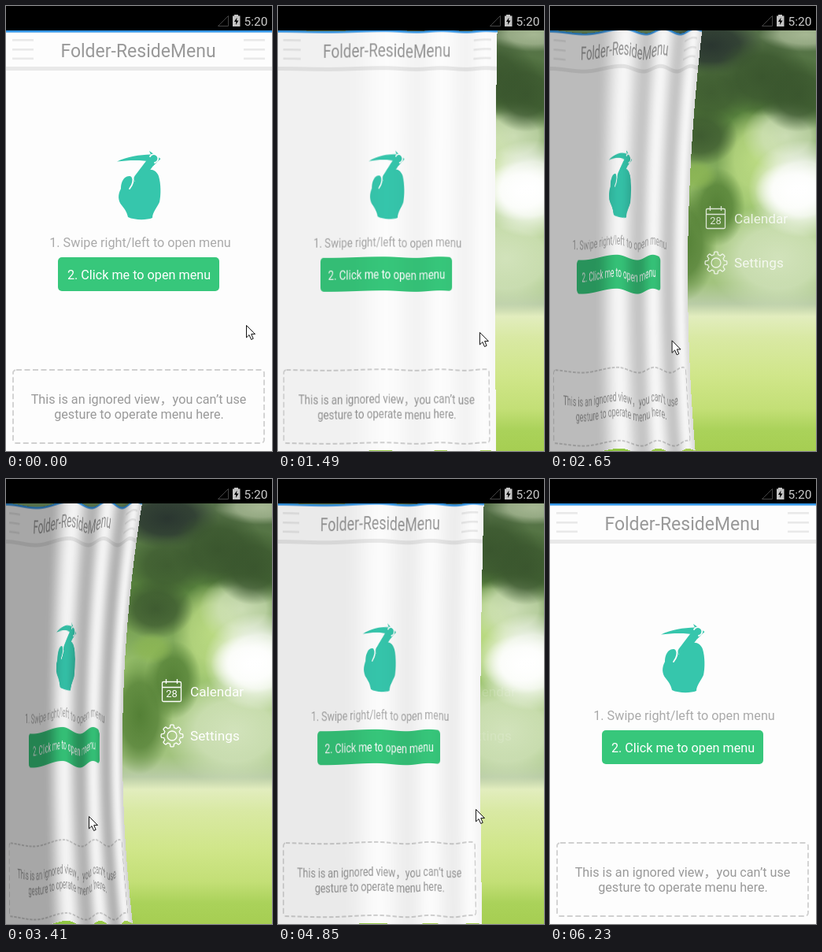
Write an HTML page with a canvas that moves like this. It is 338 px wide and 565 px high and loops after 6290 ms.

```html
<!DOCTYPE html>
<html lang="en">
<head>
<meta charset="utf-8">
<title>Folder-ResideMenu</title>
<style>
html, body { margin: 0; height: 100%; overflow: hidden; background: #000; }
canvas { display: block; width: 338px; height: 565px; }
</style>
</head>
<body>
<canvas id="stage" width="338" height="565"></canvas>
<script>
const W = 338, H = 565, TOP = 31, LOOP = 6290;
const FONT = 'Roboto, "Noto Sans CJK SC", sans-serif';
const ctx = document.getElementById('stage').getContext('2d');

// Key lists: [position, value]
const EDGE = [[620, 338], [1200, 310], [1490, 276], [2180, 207], [3050, 148],
  [3720, 148], [4280, 170], [4850, 257], [5560, 338]];
const MOUSE_X = [[620, 305], [1490, 256], [2180, 206], [3050, 111], [3170, 108], [3410, 105],
  [3720, 105], [4280, 180], [4850, 251], [5620, 298], [5800, 281]];
const MOUSE_Y = [[620, 405], [1490, 414], [2180, 420], [3050, 428], [3720, 428],
  [4280, 425], [4850, 419], [5620, 417], [5800, 570]];
const WAVE = [[0, 0], [.23, 1], [.485, -.9], [.635, 1], [.745, -.9], [.86, 1], [.95, -.9], [1, -.3]];
const LIGHT = [[.32, 0], [.5, 1], [.64, .18], [.75, 1], [.86, .18], [.95, 1], [1, .6]];

const linear = k => k;
const smooth = k => (1 - Math.cos(Math.PI * k)) / 2;

function along(keys, x, ease = linear) {
  if (x <= keys[0][0]) return keys[0][1];
  for (let i = 1; i < keys.length; i++) {
    const [x0, v0] = keys[i - 1], [x1, v1] = keys[i];
    if (x < x1) return v0 + (v1 - v0) * ease((x - x0) / (x1 - x0));
  }
  return keys[keys.length - 1][1];
}

function layer(paint) {
  const c = document.createElement('canvas');
  c.width = W;
  c.height = H;
  const g = c.getContext('2d');
  g.imageSmoothingQuality = 'high';
  if (paint) paint(g);
  return c;
}

function label(g, text, x, y, size, color, align = 'center') {
  g.font = `${size}px ${FONT}`;
  g.textAlign = align;
  g.fillStyle = color;
  g.fillText(text, x, y);
}

function box(g, x, y, w, h, r) {
  g.beginPath();
  g.roundRect(x, y, w, h, r);
}

function blob(g, x, y, rx, ry, rgb, alpha = 1) {
  g.save();
  g.translate(x, y);
  g.scale(rx, ry);
  const fill = g.createRadialGradient(0, 0, 0, 0, 0, 1);
  fill.addColorStop(0, `rgba(${rgb},${alpha})`);
  fill.addColorStop(.55, `rgba(${rgb},${alpha * .8})`);
  fill.addColorStop(1, `rgba(${rgb},0)`);
  g.fillStyle = fill;
  g.fillRect(-1, -1, 2, 2);
  g.restore();
}

function paintGarden(g) {
  const fill = g.createLinearGradient(0, TOP, 0, H);
  [[0, '#56704a'], [.2, '#56803c'], [.4, '#9cc46e'], [.6, '#a2c37e'], [.65, '#b9cca6'],
   [.68, '#e2edbe'], [.73, '#d9e9a4'], [.82, '#d0e68a'], [.9, '#c3df76'], [.95, '#aad25a'], [1, '#a6ce52']]
    .forEach(([at, color]) => fill.addColorStop(at, color));
  g.fillStyle = fill;
  g.fillRect(0, 0, W, H);
  const dark = '58,86,46', leaf = '84,128,54', lime = '186,218,130', pale = '212,228,190';
  // Light first, foliage over it
  blob(g, 325, 36, 60, 22, '180,196,160', .85);
  blob(g, 262, 195, 50, 65, lime);
  blob(g, 300, 165, 55, 45, pale, .9);
  blob(g, 290, 320, 90, 70, pale, .95);
  blob(g, 322, 232, 70, 62, '255,255,255');
  blob(g, 310, 235, 50, 38, '255,255,255');
  blob(g, 205, 50, 65, 38, '42,54,48');
  blob(g, 270, 90, 60, 50, dark);
  blob(g, 315, 112, 50, 48, dark);
  blob(g, 205, 110, 50, 40, dark, .8);
  blob(g, 190, 165, 48, 38, dark, .9);
  blob(g, 212, 255, 36, 50, leaf);
  blob(g, 170, 300, 42, 75, leaf);
  blob(g, 185, 215, 28, 20, '140,182,82', .8);
  blob(g, 0, H, 175, 40, '140,198,63');
}

function paintMenu(g) {
  g.strokeStyle = '#fff';
  g.lineWidth = 1.3;
  box(g, 198.5, 257.5, 24, 25, 1.5);
  g.moveTo(198, 264.5);
  g.lineTo(223, 264.5);
  for (const x of [203.5, 217.5]) {
    g.moveTo(x, 254);
    g.lineTo(x, 260);
  }
  g.stroke();
  label(g, '28', 210.5, 277, 13, '#fff');
  g.beginPath();
  for (let i = 0; i <= 160; i++) {
    const a = i / 160 * 2 * Math.PI;
    const r = 12.2 + 1.7 * Math.tanh(4 * Math.cos(8 * a));
    g.lineTo(211 + r * Math.cos(a), 326 + r * Math.sin(a));
  }
  g.moveTo(217, 326);
  g.arc(211, 326, 6, 0, 7);
  g.stroke();
  label(g, 'Calendar', 234, 276, 17.2, '#fff', 'left');
  label(g, 'Settings', 234, 332, 17.2, '#fff', 'left');
}

function paintHand(g) {
  const teal = '#36c6ac', paper = '#fdfdfd';
  g.fillStyle = g.strokeStyle = teal;
  g.lineCap = 'round';
  g.fill(new Path2D('M141 197.5C154 191 170 189 184 188.5L182 184L196.5 194L187 203L186.500 198C170 195 155 196 141 197.500Z'));
  g.lineWidth = 11;
  g.stroke(new Path2D('M187 194L168 219'));
  g.fill(new Path2D('M151 218C147 222 146 227 146 232C142 239 142 247 147 253C152 259 154 263 155 268C163 272 179 272 186 269C186 262 192 256 195 249C197 240 197 226 194 216C191 208 184 206 179 209L163 223C162 216 156 214 151 218Z'));
  g.strokeStyle = paper;
  g.lineWidth = 1.8;
  g.stroke(new Path2D('M160 216Q164 223 157 232M183 191A5.500 5.500 0 1 1 189 199'));
  g.lineCap = 'butt';
}

function paintPage(g) {
  g.fillStyle = '#fdfdfd';
  g.fillRect(0, TOP, W, H - TOP);
  g.fillStyle = '#3496e6';
  g.fillRect(0, TOP, W, 2.6);
  g.fillStyle = '#e9e9e9';
  g.fillRect(0, 77, W, 5);
  for (const x of [8, 302])
    for (const y of [42, 54, 65.5]) g.fillRect(x, y, 27, 2.6);
  label(g, 'Folder-ResideMenu', 168, 64.5, 23, '#999');
  paintHand(g);
  label(g, '1. Swipe right/left to open menu', 170.5, 306, 16.2, '#aaa');
  g.fillStyle = '#37c77b';
  box(g, 66, 319, 205, 43, 5);
  g.fill();
  label(g, '2. Click me to open menu', 169, 347, 16.2, '#fff');
  g.strokeStyle = '#d0d0d0';
  g.lineWidth = 1.8;
  g.setLineDash([7, 3.5]);
  box(g, 9, 462, 319, 93, 4);
  g.stroke();
  label(g, 'This is an ignored view\uff0cyou can’t use', 168.5, 505, 16.2, '#999');
  label(g, 'gesture to operate menu here.', 169, 524, 16.2, '#999');
}

function paintStatus(g) {
  g.fillStyle = '#000';
  g.fillRect(0, 0, W, TOP);
  g.strokeStyle = '#444';
  g.lineWidth = 1;
  g.stroke(new Path2D('M282.500 12.500V25.500H269.500Z'));
  g.fillStyle = '#c4c4c4';
  g.fillRect(290, 11, 5, 2);
  g.fillRect(288, 12.5, 9.5, 13.5);
  g.fillStyle = '#000';
  g.fill(new Path2D('M293.500 14.500L290 20H292.300L292 24L295.500 18.500H293Z'));
  label(g, '5:20', 317.5, 25, 15.5, '#ccc');
}

const garden = layer(paintGarden), menu = layer(paintMenu);
const page = layer(paintPage), status = layer(paintStatus);
const pleated = layer(), fold = pleated.getContext('2d');
const pointer = new Path2D('M.5 .5V16L4 12.600L6.600 18.500L9.200 17.300L6.700 11.600H11.500Z');

function drawPage(edge, open) {
  if (!open) return ctx.drawImage(page, 0, 0);
  const depth = 4.5 * open ** 1.5, dark = .34 * open ** 1.8;
  fold.clearRect(0, 0, W, H);
  for (let x = 0; x < W; x++) {
    const u = (x + .5) / W, dy = depth * along(WAVE, u, smooth);
    fold.drawImage(page, x, TOP, 1, H - TOP, x, TOP + dy, 1, H - TOP);
    fold.fillStyle = `rgba(0,0,0,${dark * (1 - .88 * along(LIGHT, u, smooth))})`;
    fold.fillRect(x, TOP + dy, 1, H - TOP);
  }
  // Each row is squeezed to the curved right edge
  for (let y = TOP; y < H; y++) {
    const width = edge + open ** 2 * 2.6e-4 * (y - 340) ** 2;
    ctx.drawImage(pleated, 0, y, W, 1, 0, y, Math.min(W, width), 1);
  }
}

function drawPointer(t) {
  if (t >= 5800) return;
  ctx.save();
  ctx.translate(along(MOUSE_X, t), along(MOUSE_Y, t));
  ctx.fillStyle = '#fff';
  ctx.strokeStyle = '#111';
  ctx.lineWidth = 1;
  ctx.fill(pointer);
  ctx.stroke(pointer);
  ctx.restore();
}

function frame(now) {
  const t = now % LOOP, edge = along(EDGE, t), open = (W - edge) / 190;
  ctx.drawImage(garden, 0, 0);
  ctx.globalAlpha = Math.max(0, (open - .33) / .67);
  ctx.drawImage(menu, 0, 0);
  ctx.globalAlpha = 1;
  drawPage(edge, open);
  ctx.drawImage(status, 0, 0);
  drawPointer(t);
  requestAnimationFrame(frame);
}

ctx.imageSmoothingQuality = 'high';
requestAnimationFrame(frame);
</script>
</body>
</html>
```
